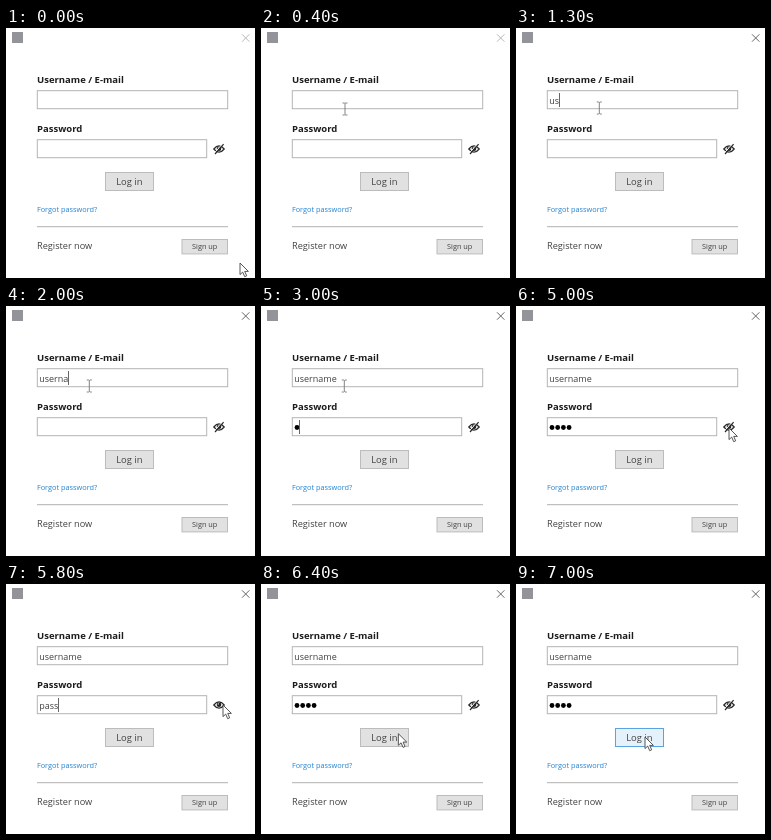
Write an HTML page that moves like this. It is 249 px wide and 250 px high and loops after 7.2 s.

```html
<!DOCTYPE html>
<html lang="en">
<head>
<meta charset="utf-8">
<title>Login form</title>
<style>
  html, body { margin: 0; width: 100%; height: 100%; overflow: hidden; background: #fff; }
  svg { display: block; width: 249px; height: 250px; }
  text { font-family: "Open Sans", "Noto Sans", sans-serif; fill: #404040; white-space: pre; }
  .label { font-size: 9.5px; font-weight: 700; fill: #1c1c1c; }
  .input { font-size: 9px; }
  .small { font-size: 7.35px; }
  .field { fill: #fff; stroke: #b4b4b4; }
  .button { fill: #e1e1e1; stroke: #bcbcbc; }
</style>
</head>
<body>
<svg viewBox="0 0 249 250">
  <rect width="249" height="250" fill="#fff"/>
  <rect x="6" y="4" width="11" height="11" fill="#92949a"/>
  <path id="close" d="M236 6.3l7.4 7.4m0-7.4l-7.4 7.4" fill="none"/>

  <text class="label" x="31" y="55.2">Username / E-mail</text>
  <rect class="field" x="31.3" y="62.7" width="190.4" height="18"/>
  <text class="input" id="user" x="33.2" y="75.8"></text>

  <text class="label" x="31" y="104.2">Password</text>
  <rect class="field" x="31.3" y="111.7" width="169.4" height="18"/>
  <text class="input" id="pass" x="33.2" y="124.8">pass</text>
  <g id="dots" fill="#000"></g>
  <path id="caret" stroke="#666" stroke-width="1"/>

  <g fill="none" stroke="#2a2a2a">
    <path d="M207.8 121Q213 114.6 218.2 121Q213 127.4 207.8 121Z" stroke-width="1.2"/>
    <circle cx="213" cy="120.7" r="2.3" fill="#222" stroke="none"/>
    <circle cx="212.3" cy="119.9" r=".6" fill="#fff" stroke="none"/>
    <g id="slash">
      <path d="M208.2 125.2L216.8 115.6" stroke="#fff" stroke-width="1"/>
      <path d="M209 126L217.6 116.2" stroke-width="1.2"/>
    </g>
  </g>

  <rect class="button" x="99.5" y="144.5" width="48" height="18"/>
  <rect id="hover" x="99.5" y="144.5" width="48" height="18" fill="#e5f1fb" stroke="#5ba3e0"/>
  <text x="110.2" y="157.4" font-size="9.4">Log in</text>

  <text class="small" x="30.9" y="184" style="fill:#2382d2">Forgot password?</text>
  <path d="M31 198.7H222" stroke="#b0b0b0"/>
  <text x="31" y="221.4" font-size="9.2">Register now</text>
  <rect class="button" x="176" y="211.5" width="45.5" height="14.4"/>
  <text class="small" x="186" y="221.4">Sign up</text>

  <path id="arrow" d="M0 0V11.6L2.7 9.1L4.7 13.7L6.7 12.8L4.7 8.4H8.4Z"
        fill="#fff" stroke="#444" stroke-width=".9" stroke-linejoin="round"/>
  <path id="beam" d="M-2.5 -6H-.7L0 -5.4L.7 -6H2.5M0 -5.4V5.4M-2.5 6H-.7L0 5.4L.7 6H2.5"
        fill="none" stroke="#777" stroke-width=".9"/>
</svg>
<script>
const LOOP = 7200, STEP = 100;
const $ = id => document.getElementById(id);
const show = (id, on) => $(id).setAttribute("visibility", on ? "visible" : "hidden");
const clamp = v => Math.max(0, Math.min(1, v));

// Mouse stops: time, x, y
const stops = [
  [0, 234, 235], [400, 84, 81], [600, 83.3, 80], [4000, 83.3, 80], [4700, 211, 122],
  [4900, 213, 122], [5300, 213, 122], [5600, 214, 121.5], [5800, 217, 121],
  [5900, 217, 121], [6500, 131, 152], [6700, 129, 153], [LOOP, 129, 153]
];
const userKeys = [1300, 1300, 1400, 1600, 1700, 1800, 2100, 2200];
const passKeys = [2900, 3100, 3300, 3500];
const ACTIVATE = 600, TAB = 2500, REVEAL = 5200, CONCEAL = 5900;
const resets = [ACTIVATE, TAB, ...userKeys, ...passKeys].sort((a, b) => a - b);
const typed = (keys, t) => keys.filter(k => k <= t).length;

$("dots").innerHTML = passKeys.map((_, i) =>
  `<circle cx="${36 + 5.7 * i}" cy="121.5" r="2.4"/>`).join("");

function mouseAt(t) {
  const i = stops.findIndex(s => s[0] > t);
  const [t0, x0, y0] = stops[i - 1], [t1, x1, y1] = stops[i];
  const p = (t - t0) / (t1 - t0), e = p * p * (3 - 2 * p);
  return [x0 + (x1 - x0) * e, y0 + (y1 - y0) * e];
}

const inside = (x, y, l, t, r, b) => x >= l && x <= r && y >= t && y <= b;

function draw(t) {
  const [x, y] = mouseAt(t);
  const overField = inside(x, y, 30, 62, 222, 81) || inside(x, y, 30, 111, 201, 130);
  for (const id of ["arrow", "beam"]) $(id).setAttribute("transform", `translate(${x} ${y})`);
  show("beam", overField);
  show("arrow", !overField);
  $("close").setAttribute("stroke", t < ACTIVATE ? "#b8b8b8" : "#666");

  $("user").textContent = "username".slice(0, typed(userKeys, t));
  const count = typed(passKeys, t);
  const revealed = t >= REVEAL && t < CONCEAL;
  show("pass", revealed);
  show("dots", !revealed);
  show("slash", !revealed);
  [...$("dots").children].forEach((dot, i) => dot.setAttribute("opacity", i < count ? 1 : 0));

  // The caret blinks every half second and restarts on each input.
  const last = resets.filter(r => r <= t).pop();
  show("caret", last !== undefined && (t - last) % 1000 < 500);
  const inPass = t >= TAB;
  const width = !inPass ? $("user").getComputedTextLength()
    : revealed ? $("pass").getComputedTextLength() : 5.7 * count;
  const caretX = Math.floor(33.2 + width) + .5;
  $("caret").setAttribute("d", `M${caretX} ${inPass ? 114 : 65}v14`);

  $("hover").setAttribute("opacity", clamp((t - 6400) / 200));
}

function frame(now) {
  draw(Math.floor((now - start) % LOOP / STEP) * STEP);
  requestAnimationFrame(frame);
}
const start = performance.now();
draw(0);
requestAnimationFrame(now => frame(Math.max(now, start)));
</script>
</body>
</html>
```
